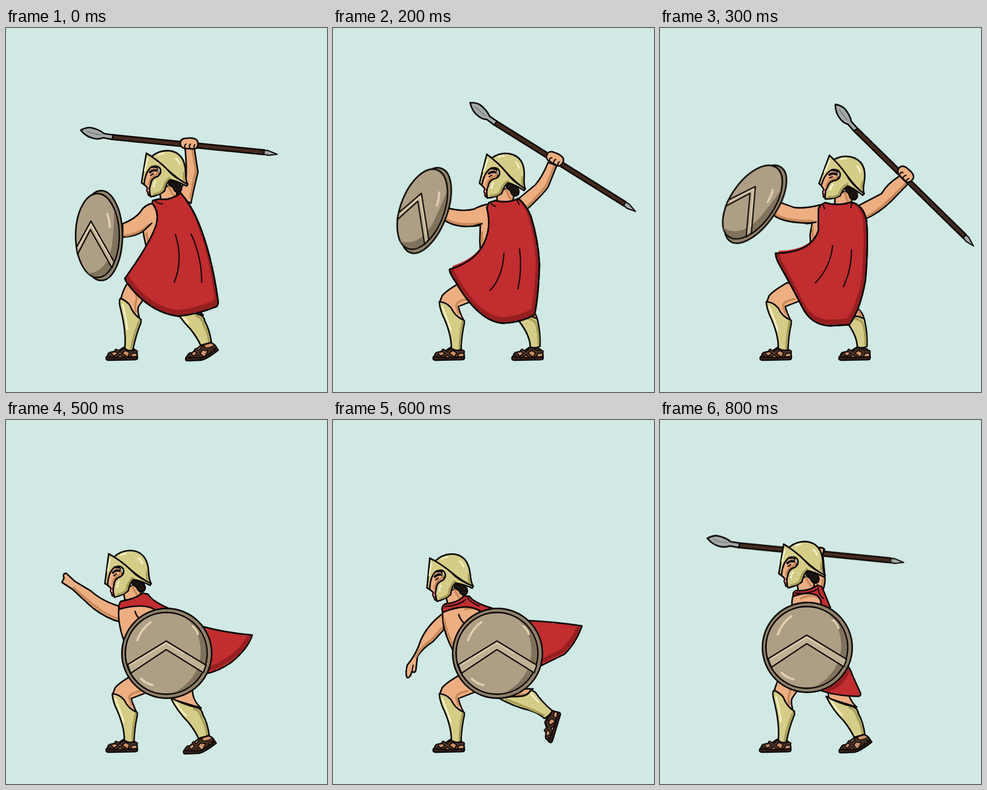
An HTML page without scripts for the animation above (0.9 s loop, 597 by 677 pixels).

```html
<!DOCTYPE html>
<html lang="en">
<head>
<meta charset="utf-8">
<title>Spear thrower</title>
<style>
html, body { margin: 0; width: 100%; height: 100%; overflow: hidden; background: #d0e9e4; }
svg { display: block; width: 597px; height: 677px; fill: none; stroke: #0d0a08; stroke-width: 2.9; stroke-linejoin: round; stroke-linecap: round; }
.skin { fill: #edae81; }
.skin-dim { stroke: #c68857; stroke-width: 4; }
.brass { fill: #d5cd87; }
.brass-dim { stroke: #a89d58; stroke-width: 4; }
.brass-hi { stroke: #f3efcb; stroke-width: 3; }
.red { fill: #c22d2f; }
.red-dim { fill: #971f20; }
.red-shade { stroke: #971f20; stroke-width: 8; }
.lit { fill: #c22d2f; stroke: none; transform-box: fill-box; transform-origin: 45% 0; transform: scale(.925, .95); }
.bronze { fill: #ae9e84; }
.rim { fill: #918169; }
.bronze-dim { fill: #80725c; stroke: none; }
.chevron { fill: #c0b195; stroke-width: 2.5; }
.bronze-hi { stroke: #e0d0b0; stroke-width: 4; }
.wood { fill: #472a1e; }
.steel { fill: #a3a9a8; }
.toes { fill: #cf9167; }
.sole { fill: #35211a; stroke-width: 2.5; }
.strap { stroke-width: 7; }
.strap + .strap { stroke: #4a3026; stroke-width: 3.5; }
.hair { fill: #1b1511; }
.thin { stroke-width: 2.3; }

/* poses sit side by side; the strip moves one stage width per step */
#strip { animation: play .9s steps(9) infinite; }
@keyframes play { to { transform: translateX(-5373px); } }
</style>
</head>
<body>
<svg viewBox="0 0 597 677">
<defs>
  <g id="head">
    <path class="skin" d="M24,66 L27,86 Q42,92 55,84 L60,55Z"/>
    <path class="skin-dim" d="M42,62 Q46,74 53,80"/>
    <path class="hair" d="M42,50 L62,56 Q69,66 62,72 Q53,74 50,64 L42,58Z"/>
    <path class="skin" d="M-3,40 L-7,56 L-2,60 L2,64 L1,69 L3,74 L4,78 L10,80 L24,40 L20,26 L4,26Z"/>
    <path class="skin-dim" d="M21,31 Q23,37 18,40 Q7,44 5,57"/>
    <path fill="#c33" stroke="none" d="M2,64 L7,64 L6,75 L4,75 L2,69Z"/>
    <path stroke="#fff" stroke-width="2" d="M3,69 L6,69"/>
    <path class="brass" d="M0,0 L-9,55 L-4,57 Q-2,34 10,25 Q22,21 26,29 Q29,38 21,43 Q9,46 8,58 Q4,66 8,81 Q24,78 34,70 Q37,55 44,49 Q58,52 75,61 L77,57 Q50,45 39,30 Q22,12 0,0Z"/>
    <path class="brass-dim" d="M14,76 Q28,74 31,67 Q34,53 43,46"/>
    <path class="brass" d="M0,0 L10,6 Q22,-5 40,-5 Q72,-3 73,36 Q73,50 77,58 Q58,48 39,30 Q22,13 0,0Z"/>
    <path class="brass-dim" d="M70,36 Q69,47 71,51"/>
    <path class="brass-hi" d="M55,10 Q60,14 62,20 M22,3 Q27,0 32,0 M2,10 L-3,32 M14,62 Q14,56 17,52"/>
    <path stroke-width="4.500" d="M7,35 Q13,30 19,32"/>
    <path class="thin" d="M8,41 L13,38"/>
  </g>

  <g id="spear">
    <path class="wood" d="M58,1.5 L344,-5 L345,3.5 L59,10Z"/>
    <path class="steel" d="M0,0 Q8,-6 17,-7 Q33,-6 44,1 L61,1.5 L60,10 L43,9 Q36,13 28,12.5 Q12,12 0,0Z"/>
    <path stroke="#737979" stroke-width="1.5" d="M12,1 Q24,4 38,4"/>
    <path class="steel thin" d="M343,-4 L350,-5 L368,0 L352,4 L344,3Z"/>
  </g>

  <g id="fist">
    <path class="skin" d="M-17,0 Q-17,-10 -5,-10 Q14,-12 16,-2 Q17,8 10,10 L-8,9 Q-16,8 -17,0Z"/>
    <path class="thin" d="M-8,8 Q-10,2 -6,1 M1,9 Q-1,3 2,1 M9,9 Q8,4 10,2"/>
  </g>

  <g id="disc">
    <circle class="rim" r="83.5"/>
    <circle class="bronze" cx="-1" r="76"/>
    <path class="bronze-dim" d="M38,-64 A75,75 0 0 1 10,74 A84,84 0 0 0 38,-64Z"/>
    <path class="chevron" d="M-73,21 L-1,-23 L73,22 L68,36 L-1,-7 L-67,37Z"/>
    <path stroke="#e0d0b0" stroke-width="2" d="M-67,21 L-1,-19 L30,0"/>
    <path class="bronze-hi" d="M-55,-24 Q-47,-46 -30,-58 M48,-51 Q56,-44 58,-36 M-48,47 Q-38,57 -26,59"/>
  </g>

  <g id="oval">
    <ellipse class="rim" cx="4" rx="39.500" ry="83.5"/>
    <ellipse class="bronze" cx="-3" rx="40.500" ry="78"/>
    <path class="bronze-dim" d="M28,-48 Q50,20 14,70 Q0,82 -22,70 Q14,70 24,20 Q28,-14 28,-48Z"/>
    <path class="chevron" d="M-42,22 L-15,-27 L28,49 L24,60 L-16,-11 L-40,35Z"/>
    <path stroke="#e0d0b0" stroke-width="2" d="M-38,22 L-15,-21 L20,40"/>
    <path class="bronze-hi" stroke-width="3" d="M15,-40 Q19,-32 20,-16"/>
  </g>

  <path id="laces" d="M205,600 L222,612 M222,597 L203,612 M226,599 Q234,604 242,602 M233,603 L229,612 M193,606 L198,611"/>
  <g id="foot">
    <path class="toes" d="M189,612 Q188,605 196,603 L210,600 L219,594 L238,597 Q245,602 244,613 L190,615Z"/>
    <use href="#laces" class="strap"/><use href="#laces" class="strap"/>
    <path class="sole" d="M187,611 Q184,618 191,618 L240,617 Q246,617 244,611 Q215,615 187,611Z"/>
  </g>

  <path id="laces-up" d="M352,599 L364,613 M366,593 L350,613 M364,596 Q376,600 387,593 M378,600 L373,608 M341,607 L346,612"/>
  <g id="heel-up">
    <path class="toes" d="M336,612 Q336,606 345,604 L362,590 L380,585 Q391,590 392,599 L366,616 L337,616Z"/>
    <use href="#laces-up" class="strap"/><use href="#laces-up" class="strap"/>
    <path class="sole" d="M334,612 Q331,619 337,619 L362,618 Q374,615 394,599 L391,595 Q378,607 364,613 Q346,614 334,612Z"/>
  </g>

  <g id="leg">
    <path class="skin" d="M229,470 Q216,488 213,508 L250,546 Q243,524 247,517 L256,504 L258,470Z"/>
    <path class="skin-dim" d="M232,484 Q246,494 242,508 Q238,518 242,528"/>
    <use href="#foot"/>
    <path class="brass" d="M213,503 Q209,506 213,522 Q224,565 221,596 Q228,602 236,599 Q241,572 251,548 L251,542 Q236,532 230,515 Q222,506 213,503Z"/>
    <path class="brass-dim" d="M248,545 Q237,570 233,596"/>
    <path class="brass-hi" d="M217,514 Q224,542 226,560"/>
  </g>

  <g id="leg-bent">
    <path class="skin" d="M236,474 Q210,489 203,498 L198,511 L244,546 Q236,530 233,518 L264,506 L260,474Z"/>
    <path class="skin-dim" d="M250,504 Q230,508 229,516 L233,530"/>
    <use href="#foot"/>
    <path class="brass" d="M198,509 Q197,515 203,532 Q221,570 220,596 Q229,602 238,598 Q239,572 244,550 L244,544 Q227,537 220,521 Q211,510 198,509Z"/>
    <path class="brass-dim" d="M241,546 Q236,572 235,595"/>
    <path class="brass-hi" d="M203,518 Q214,545 219,562"/>
  </g>

  <g id="stand">
    <path class="skin" d="M345,520 L368,522 Q378,530 380,543 L350,545Z"/>
    <path class="skin-dim" d="M370,527 L375,537"/>
    <use href="#foot" x="146.500"/>
    <path class="brass" d="M340,538 Q366,568 367,593 Q376,597 385,592 Q386,566 380,541 L368,536Z"/>
    <path class="brass-dim" d="M362,540 Q376,543 378,552 Q383,570 382,588"/>
  </g>

  <g id="push">
    <path class="skin" d="M312,500 L314,518 L366,534 Q348,518 350,495Z"/>
    <path class="brass" d="M309,514 Q320,538 342,560 Q354,575 361,590 Q371,592 381,585 Q378,562 369,546 Q367,534 355,532 Q332,527 309,514Z"/>
    <path class="brass-dim" d="M352,535 Q364,538 367,553 Q375,567 377,584"/>
    <path class="brass-hi" d="M319,523 Q326,536 338,548"/>
    <use href="#heel-up"/>
  </g>

  <g id="kick">
    <path class="skin" d="M320,500 L330,518 L362,514 L372,500Z"/>
    <path class="skin-dim" d="M338,512 L360,510"/>
    <use href="#foot" transform="translate(404 600) rotate(-72) translate(-186 -615)"/>
    <path class="brass" d="M306,516 Q338,534 366,540 Q384,546 393,555 Q402,551 408,541 Q388,524 376,506 L368,502 Q362,514 346,514Z"/>
    <path class="brass-dim" d="M322,520 Q360,534 392,549"/>
    <path class="brass-hi" d="M368,509 Q376,518 382,524"/>
  </g>

  <path id="cape0" d="M273,321 L272,326 Q287,345 278,370 Q265,405 221,466 Q222,472 240,492 Q275,530 320,536 Q355,533 392,518 Q396,512 394,505 Q382,420 358,362 Q345,330 325,307 Q305,322 285,318Z"/>
  <path id="cape1" d="M281,323 L279,330 Q290,355 281,380 Q268,418 219,457 Q219,463 234,482 Q272,537 317,542 Q352,540 384,526 Q389,506 389,472 Q382,408 363,356 Q352,330 335,312 Q315,325 293,320Z"/>
  <path id="cape2" d="M290,325 L286,334 Q294,365 285,390 Q272,432 217,449 Q216,455 228,472 Q270,545 315,549 Q350,548 375,533 Q382,500 384,440 Q382,395 368,350 Q360,330 345,317 Q325,327 302,321Z"/>
  <path id="cape3" d="M299,329 L295,335 Q294,360 295,375 Q283,418 215,419 Q215,428 222,440 Q250,490 264,518 Q280,552 315,554 L352,552 Q372,525 382,470 Q388,400 384,358 Q378,328 355,324 Q330,332 307,325Z"/>
</defs>

<rect width="597" height="677" fill="#d0e9e4" stroke="none"/>
<g id="strip">

  <!-- wind up -->
  <g>
    <use href="#push" x="1"/>
    <use href="#leg"/>
    <path class="skin" d="M333,222 Q337,265 334,285 L316,312 L344,326 Q348,305 357,268 L350,222Z"/>
    <path class="skin-dim" d="M347,226 L353,266 Q347,290 343,316"/>
    <use href="#spear" transform="translate(139 190) rotate(7)"/>
    <use href="#fist" x="341" y="215"/>
    <path class="skin" d="M274,326 Q258,328 250,342 Q240,355 217,364 L217,389 Q240,388 255,378 L257,390 L262,412 L285,380 L285,340Z"/>
    <path class="skin-dim" d="M222,386 Q240,384 254,375 L266,366 M261,382 L266,402"/>
    <path d="M255,378 L271,363"/>
    <use href="#head" x="261" y="233"/>
    <use href="#cape0" class="red-dim"/><use href="#cape0" class="lit"/><use href="#cape0"/>
    <path class="thin" d="M315,384 Q330,430 313,473 M344,383 Q364,425 364,473 M278,322 Q285,328 291,327"/>
    <use href="#oval" transform="translate(173 386)"/>
  </g>

  <g transform="translate(597)">
    <use href="#stand"/>
    <use href="#leg-bent"/>
    <path class="skin" d="M367,234 Q361,272 352,290 L330,314 L352,332 Q370,304 379,276 L385,238Z"/>
    <path class="skin-dim" d="M381,240 L375,276 Q364,304 352,324"/>
    <use href="#spear" transform="translate(189 157) rotate(20)"/>
    <use href="#fist" transform="translate(378 228) rotate(13)"/>
    <path class="skin" d="M282,327 Q262,330 250,340 Q238,350 215,350 L212,374 Q238,380 264,370 L265,395 L267,412 L288,380 L287,340Z"/>
    <path class="skin-dim" d="M218,372 Q240,376 264,366 M269,386 L272,402"/>
    <path d="M264,371 L274,364"/>
    <use href="#head" transform="translate(273 234) rotate(2.500)"/>
    <use href="#cape1" class="red-dim"/><use href="#cape1" class="lit"/><use href="#cape1"/>
    <path class="thin" d="M317,402 Q324,446 303,480 M346,397 Q360,438 354,479"/>
    <use href="#oval" transform="translate(171 362) rotate(10.500)"/>
  </g>

  <g transform="translate(1194)">
    <use href="#stand"/>
    <use href="#leg-bent"/>
    <path class="skin" d="M400,250 Q390,276 376,292 L342,320 L360,338 Q390,310 400,296 L416,256Z"/>
    <path class="skin-dim" d="M411,258 L396,294 Q380,314 362,331"/>
    <use href="#spear" transform="translate(255 139) rotate(33.300)"/>
    <use href="#fist" transform="translate(413 243) rotate(25)"/>
    <path class="skin" d="M290,327 Q272,331 262,337 Q240,342 214,335 L208,358 Q232,374 274,367 L273,396 L274,412 L290,385 L291,340Z"/>
    <path class="skin-dim" d="M213,357 Q234,369 272,363 M277,380 L278,404"/>
    <path d="M262,368 L277,364"/>
    <use href="#head" transform="translate(286 235) rotate(5)"/>
    <use href="#cape2" class="red-dim"/><use href="#cape2" class="lit"/><use href="#cape2"/>
    <path class="thin" d="M318,419 Q315,465 292,488 M347,411 Q352,450 344,485 M294,327 L302,332 M342,320 L346,328"/>
    <use href="#oval" transform="translate(169 338) rotate(20.500)"/>
  </g>

  <g transform="translate(1791)">
    <use href="#stand"/>
    <use href="#leg-bent"/>
    <path class="skin" d="M446,275 Q422,290 412,308 L368,331 L380,356 Q408,344 430,322 L464,287Z"/>
    <path class="skin-dim" d="M458,288 L428,318 Q408,338 386,350"/>
    <use href="#spear" transform="translate(326 142) rotate(45.700)"/>
    <use href="#fist" transform="translate(457 272) rotate(42)"/>
    <path class="skin" d="M298,329 Q272,336 250,334 L222,324 L211,348 Q230,363 283,363 L279,385 L280,400 L298,375 L297,340Z"/>
    <path class="skin-dim" d="M216,347 Q234,359 284,359 M284,370 L284,392"/>
    <path d="M272,364 L290,361"/>
    <use href="#head" transform="translate(315 237) rotate(11)"/>
    <use href="#cape3" class="red-dim"/><use href="#cape3" class="lit"/><use href="#cape3"/>
    <path class="thin" d="M321,405 Q317,445 289,474 M356,413 Q356,450 341,481 M303,329 L306,336 M357,326 L355,334"/>
    <use href="#oval" transform="translate(174.500 325.500) rotate(34.500)"/>
  </g>

  <!-- throw -->
  <g transform="translate(2388)">
    <use href="#push" x="-3" y="2"/>
    <use href="#leg"/>
    <path class="skin" d="M240,222 L239,246 L259,248 L258,222Z"/>
    <use href="#spear" transform="translate(65 171) rotate(15)"/>
    <use href="#fist" transform="translate(248 218) rotate(3)"/>
    <path class="red" d="M362,396 Q400,415 450,416 Q455,418 452,425 Q430,455 415,460 Q390,480 355,485Z"/>
    <path class="red-shade" d="M446,423 Q426,450 410,455 Q390,471 366,478 M377,408 L380,440"/>
    <path class="skin" d="M217,340 Q211,360 217,392 L240,410 L300,360 L270,335Z"/>
    <path class="skin-dim" d="M217,368 L221,390 M250,352 Q270,344 284,350"/>
    <path d="M247,350 Q247,358 252,364"/>
    <use href="#head" transform="translate(203 242) rotate(1)"/>
    <path class="red" d="M217,346 Q214,334 222,330 Q250,328 264,317 L274,321 Q284,334 310,352 L286,356 Q270,332 217,346Z"/>
    <path class="thin" d="M224,336 Q250,336 266,326 M268,322 Q276,336 292,345"/>
    <use href="#disc" x="292" y="434"/>
  </g>

  <g transform="translate(2985)">
    <use href="#push" x="-3" y="2"/>
    <use href="#leg-bent"/>
    <path class="red" d="M365,384 Q410,396 458,400 Q450,425 420,450 Q395,468 370,472Z"/>
    <path class="red-shade" d="M451,406 Q437,430 413,445 Q396,457 380,462"/>
    <path class="skin" d="M216,348 Q180,338 158,318 L128,300 L112,285 Q104,286 108,294 L104,302 L124,315 Q146,336 162,350 Q188,370 214,376Z"/>
    <path class="skin-dim" d="M126,312 Q148,332 164,345 Q188,364 210,370"/>
    <path class="skin" d="M210,350 Q207,375 219,410 L240,410 L300,360 L265,340Z"/>
    <path d="M240,356 Q242,364 249,371"/>
    <use href="#head" transform="translate(191 249) rotate(-2)"/>
    <path class="red" d="M210,352 Q209,341 214,337 Q240,333 254,322 L264,324 Q272,337 302,350 L282,356 Q260,338 210,352Z"/>
    <use href="#disc" x="299" y="434"/>
  </g>

  <g transform="translate(3582)">
    <use href="#kick"/>
    <use href="#leg-bent"/>
    <path class="red" d="M362,373 Q410,375 463,383 Q452,415 430,436 Q415,443 385,458Z"/>
    <path class="red-shade" d="M456,388 Q446,411 426,430 Q410,437 394,446"/>
    <path class="skin" d="M204,360 Q175,382 163,410 Q155,436 138,456 Q134,474 138,479 Q143,481 147,467 Q151,472 154,466 L157,440 Q166,425 186,412 L206,390Z"/>
    <path class="skin-dim" d="M154,441 Q164,421 184,408 L202,387"/>
    <path class="thin" d="M147,467 L149,456"/>
    <path class="skin" d="M204,356 Q202,390 224,430 L250,410 L300,360 L262,342Z"/>
    <path class="skin-dim" d="M207,372 Q211,396 224,420 M246,352 Q262,347 272,354"/>
    <path d="M234,362 Q236,371 245,379"/>
    <use href="#head" transform="translate(180 257) rotate(-4)"/>
    <path class="red" d="M204,358 Q200,348 208,342 Q232,340 244,327 L254,328 Q262,340 296,350 L276,357 Q250,338 204,358Z"/>
    <path class="thin" d="M208,347 Q234,345 247,334 M250,330 Q256,340 272,346"/>
    <use href="#disc" x="306" y="434"/>
  </g>

  <!-- recover -->
  <g transform="translate(4179)">
    <use href="#push"/>
    <use href="#leg"/>
    <path class="red" d="M355,400 L421,449 Q405,475 345,490Z"/>
    <path class="red-shade" d="M414,451 Q398,469 358,481"/>
    <path class="skin" d="M228,346 Q205,368 196,398 Q188,424 174,446 Q171,463 175,467 Q181,467 183,456 Q188,460 190,453 L194,430 Q206,412 216,402 L232,380Z"/>
    <path class="skin-dim" d="M190,430 Q202,410 213,398 L228,376"/>
    <path class="skin" d="M227,342 Q222,370 230,410 L250,410 L300,360 L274,330Z"/>
    <path d="M252,346 Q254,354 260,360"/>
    <use href="#head" transform="translate(205 244) rotate(-2)"/>
    <path class="red" d="M226,342 Q224,333 230,330 Q256,327 270,317 L279,319 Q284,332 306,349 L284,350 Q264,328 226,342Z"/>
    <use href="#disc" x="290" y="428"/>
  </g>

  <g transform="translate(4776)">
    <use href="#push"/>
    <use href="#leg" x="-1"/>
    <path class="red" d="M340,450 Q352,455 358,475 L373,508 Q374,514 368,514 Q325,513 296,502Z"/>
    <path class="red-shade" d="M349,466 Q340,492 312,502"/>
    <path class="skin" d="M288,240 Q302,234 306,241 L303,252 L307,296 Q306,312 302,318 L280,312 L284,260Z"/>
    <path class="skin-dim" d="M303,296 L301,310"/>
    <use href="#spear" transform="translate(88 220) rotate(7)"/>
    <path class="skin" d="M290,240 Q300,235 305,240 L303,250 L290,250Z"/>
    <path class="skin" d="M248,325 Q244,336 246,350 L300,350 L302,330 L280,315Z"/>
    <path class="skin-dim" d="M262,332 Q282,322 296,331"/>
    <use href="#head" x="230" y="231"/>
    <path class="red" d="M248,328 Q246,320 253,317 Q276,320 293,307 L301,310 Q306,322 317,349 L299,348 Q302,334 292,326 Q275,318 248,328Z"/>
    <path class="thin" d="M252,322 Q278,324 292,315 M294,311 Q294,324 304,332"/>
    <use href="#disc" x="274" y="423"/>
  </g>
</g>
</svg>
</body>
</html>
```
